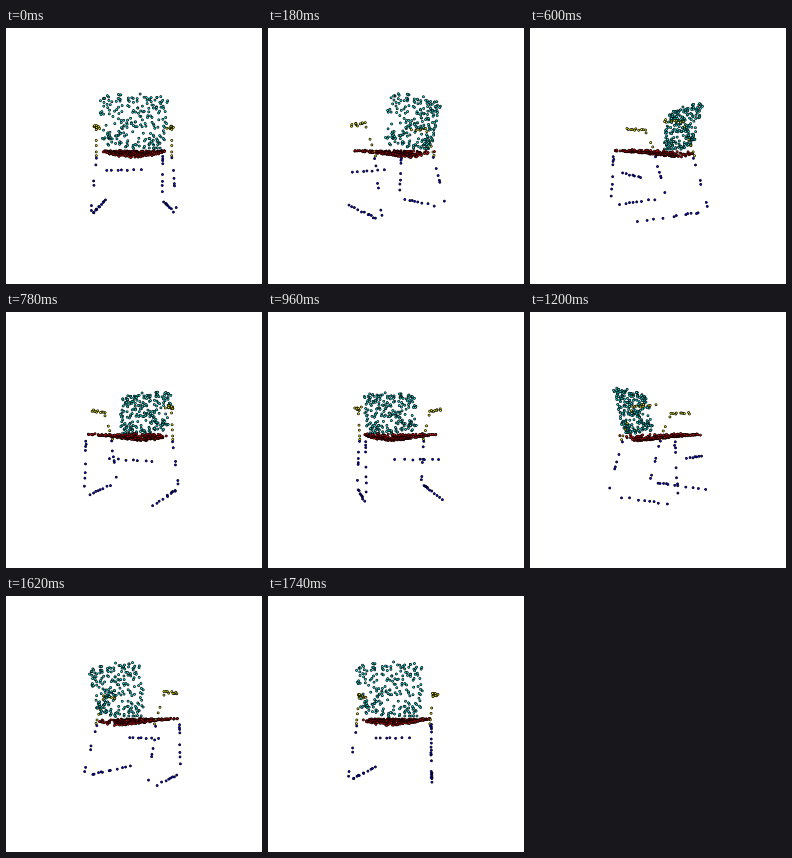
A matplotlib script for the animation above (1800 ms loop, 256 by 256 pixels).

```python
import numpy as np
import matplotlib.pyplot as plt
from matplotlib.animation import FuncAnimation

SIZE, DPI = 256, 100
FRAMES, INTERVAL = 30, 60
CX, CY, DIST = 128, 125, 235   # screen centre, horizon, eye distance

rng = np.random.default_rng(12)


def stack(x, y, z):
    return np.column_stack(np.broadcast_arrays(x, y, z)).astype(float)


def jitter(pts, amount):
    return pts + rng.normal(0, amount, pts.shape)


# Model axes: x to the right, y down, z towards the chair's back.
def backrest(n):
    h = rng.uniform(0.08, 1, n)
    u = rng.uniform(-1, 1, n)
    x = u * (22 + 7.5 * np.minimum(1, h / 0.3))
    z = 27 + 7.5 * h - 6 * u**2 * (1 - h**2)
    return jitter(stack(x, -50 * h, z), 0.3)


def seat(n):
    t = rng.uniform(0, 1, n)
    u = rng.uniform(-1, 1, n)
    x = u * (32.5 - 5 * t**2)
    y = -2.5 + 6.5 * t * (1 - 0.8 * u**2)
    return jitter(stack(x, y, -36 + 63 * t), 0.35)


def back_leg(side, ys):
    y = np.array(ys)
    return stack(side * (35 + y / 25), y, 15.5 + 0.32 * y)


def runner(side, zs):
    z = np.array(zs)
    return stack(side * (35.5 + z / 17), 54.5, z)


def armrest(side):
    z = np.linspace(-18, 4, 10) + rng.uniform(-1, 1, 10)
    top = stack(side * (38.5 + rng.uniform(-3, 3, 10)),
                -26.5 + rng.uniform(-1, 1, 10), z)
    y = np.array([-23, -12, -7, -1, 2.5])
    post = stack(side * (35 - y / 12), y, 17 + y / 2)
    return np.vstack([top, post])


front_y = np.array([4, 7, 9.5, 12.5, 25, 33, 37.5, 45])
frame = np.vstack([
    stack(33, front_y, -34.5 - front_y / 18),
    stack([-31, -26.5, -18, -15, -7.5, 0, 8], 19.5, -34),
    back_leg(1, [4.5, 16, 23, 27, 29.5, 48]),
    back_leg(-1, [5, 10.5, 25, 29, 46, 50]),
    runner(1, [17, 8, -1, -7.5, -12, -16, -20, -28]),
    runner(-1, [21, 19, 13, 9.5, 8, -2, -5, -15, -24, -30, -38]),
])
parts = [
    (backrest(215), "#00ffff"),
    (seat(230), "#ff0000"),
    (np.vstack([armrest(1), armrest(-1)]), "#ffff00"),
    (jitter(frame, 0.3), "#0000ff"),
]
points = np.vstack([p for p, _ in parts])
colors = np.concatenate([[c] * len(p) for p, c in parts])

fig = plt.figure(figsize=(SIZE / DPI, SIZE / DPI), dpi=DPI, facecolor="white")
ax = fig.add_axes([0, 0, 1, 1])
ax.set(xlim=(0, SIZE), ylim=(SIZE, 0))
ax.axis("off")
dots = ax.scatter(points[:, 0], points[:, 1], s=2.2, c=colors,
                  edgecolors="black", linewidths=0.5)


def update(i):
    a = 2 * np.pi * i / FRAMES
    x, y, z = points.T
    depth = z * np.cos(a) - x * np.sin(a)
    scale = DIST / (DIST - depth)
    px = CX + (x * np.cos(a) + z * np.sin(a)) * scale
    py = CY + y * scale
    order = np.argsort(depth)
    dots.set_offsets(np.column_stack([px, py])[order])
    dots.set_facecolors(colors[order])
    return (dots,)


anim = FuncAnimation(fig, update, frames=FRAMES, interval=INTERVAL,
                     repeat=True, repeat_delay=0)
plt.show()
```
